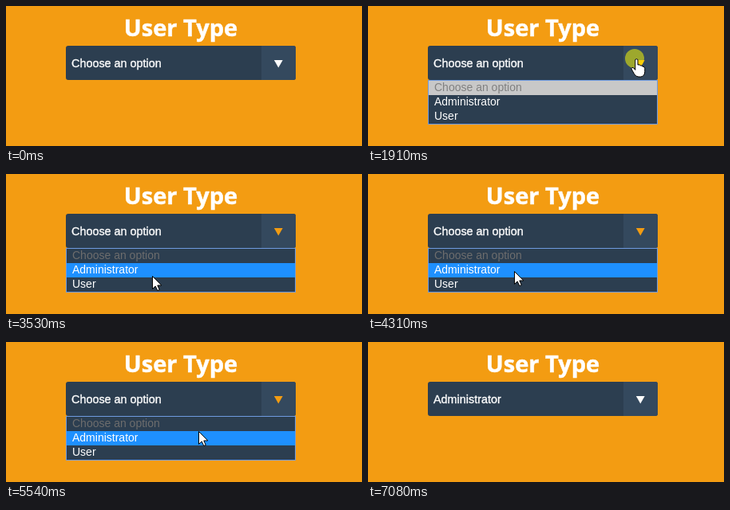
Recreate the animation shown at these times as an HTML page. Size 446 by 176 pixels, loop 7.69 s.

```html
<!DOCTYPE html>
<html lang="en">
<head>
<meta charset="utf-8">
<title>User Type select</title>
<style>
  html, body { margin: 0; width: 100%; height: 100%; overflow: hidden; background: #f39c12; }
  svg { display: block; width: 446px; height: 176px; }
  text { font-family: "Liberation Sans", Arial, sans-serif; fill: #fff; }
  .title { font: 700 29px "Open Sans", sans-serif; stroke: #fff; stroke-width: .5; }
  .value { font-size: 14.4px; stroke: #fff; stroke-width: .35; }
  .list text { font-size: 14px; }
  .cursor path { fill: #fff; stroke: #000; stroke-linejoin: round; }
</style>
</head>
<body>
<svg viewBox="0 0 446 176">
  <rect width="446" height="176" fill="#f39c12"/>
  <text class="title" x="219" y="38" text-anchor="middle">User Type</text>

  <clipPath id="box"><rect x="75" y="50" width="288" height="43" rx="3"/></clipPath>
  <g clip-path="url(#box)">
    <rect x="75" y="50" width="288" height="43" fill="#2c3e50"/>
    <rect x="320" y="50" width="43" height="43" fill="#34495e"/>
  </g>
  <text class="value" id="value" x="82" y="77"></text>
  <path id="caret" d="M335.9 68h10.8L341.3 77.4z"/>

  <g class="list" id="list">
    <rect x="75.5" y="93.5" width="287" height="55" fill="#2c3e50" stroke="#6f9be0"/>
    <rect id="mark" x="76" width="286" height="18"/>
    <text id="hint" x="83" y="107">Choose an option</text>
    <text x="83" y="125">Administrator</text>
    <text x="83" y="143">User</text>
  </g>

  <circle id="click" r="12" fill="#ff0" fill-opacity=".52"/>
  <g class="cursor" id="cursor">
    <path id="arrow" d="M.5 .5V16.5L4.2 13 6.8 18.6 9.3 17.5 6.8 12H11.8z"/>
    <path id="hand" d="M-1.2 1Q-1.2-.3.4-.3T2 1V7Q5 6 5.2 8 7.9 7.2 8.1 9.2 10.8 8.7 10.8 11.2V15.5Q10.6 21.6 5.5 22H3Q-.6 22-2.4 18.5L-5.6 12.9Q-6.6 10.9-5 10.3-3.2 10-1.2 13.4Z"/>
  </g>
</svg>
<script>
  const LOOP = 7690, START = 680, TICK = 77;
  // Ticks of the main events
  const ENTER = 0, HOVER = 4, PRESS = 15, OPEN = 16, PICK = 70, CLOSE = 72, LEAVE = 83;

  // Pointer moves in ticks; a higher power brakes harder
  const ENTRY = { x: 342, y: 160 };
  const MOVES = [
    { from: ENTER, to: HOVER, x: 333, y: 90, power: 1 },
    { from: HOVER, to: 7, x: 336, y: 67, power: 1 },
    { from: 24, to: 31, x: 183, y: 119, power: 1 },
    { from: 34, to: 37, x: 183, y: 128, power: 1 },
    { from: 46, to: 48, x: 183, y: 121, power: 3 },
    { from: 50, to: 58, x: 336, y: 76, power: 1 },
    { from: 60, to: 65, x: 235, y: 119, power: 2 },
    { from: 77, to: LEAVE, x: 320, y: 176, power: 1 }
  ];

  const $ = id => document.getElementById(id);
  const set = (id, attrs) => {
    for (const key in attrs) $(id).setAttribute(key, attrs[key]);
  };
  const show = (id, on) => set(id, { visibility: on ? "inherit" : "hidden" });
  const within = (k, a, b) => k >= a && k < b;
  const clamp = v => Math.min(1, Math.max(0, v));
  const easeOut = (f, power) => 1 - (1 - f) ** power;

  // Sideways motion settles sooner than vertical, which bends the path
  function pointer(k) {
    let { x, y } = ENTRY;
    for (const m of MOVES) {
      const f = clamp((k - m.from) / (m.to - m.from));
      x += (m.x - x) * easeOut(f, m.power * 1.5);
      y += (m.y - y) * easeOut(f, m.power);
    }
    return [Math.round(x), Math.round(y)];
  }

  function caretColor(k) {
    const fade = at => clamp((k - at + 0.7) / 2.7) * (k >= at);
    const f = fade(HOVER) - fade(CLOSE);
    return `rgb(${[243, 156, 18].map(c => Math.round(255 + (c - 255) * f))})`;
  }

  function draw(time) {
    const k = Math.floor((time % LOOP - START + 10) / TICK);

    $("value").textContent = k < CLOSE ? "Choose an option" : "Administrator";
    set("caret", { fill: caretColor(k) });

    const row = k < 30 ? 0 : within(k, 39, 47) ? 2 : 1;
    show("list", within(k, OPEN, CLOSE));
    set("mark", { y: 94 + 18 * row, fill: row ? "#1e90ff" : "#c8c8c8" });
    set("hint", { style: `fill: ${row ? "#6d6d6d" : "#808080"}` });

    const first = within(k, PRESS, PRESS + 2);
    show("click", first || within(k, PICK, PICK + 2));
    set("click", first ? { cx: 334, cy: 66 } : { cx: 235, cy: 119 });

    const [x, y] = pointer(k);
    const onSelect = within(x, 75, 363) && within(y, 50, 93);
    show("cursor", within(k, ENTER, LEAVE));
    set("cursor", { transform: `translate(${x} ${y})` });
    show("hand", onSelect);
    show("arrow", !onSelect);
  }

  const begin = performance.now();
  function frame() {
    draw(performance.now() - begin);
    requestAnimationFrame(frame);
  }
  frame();
</script>
</body>
</html>
```
